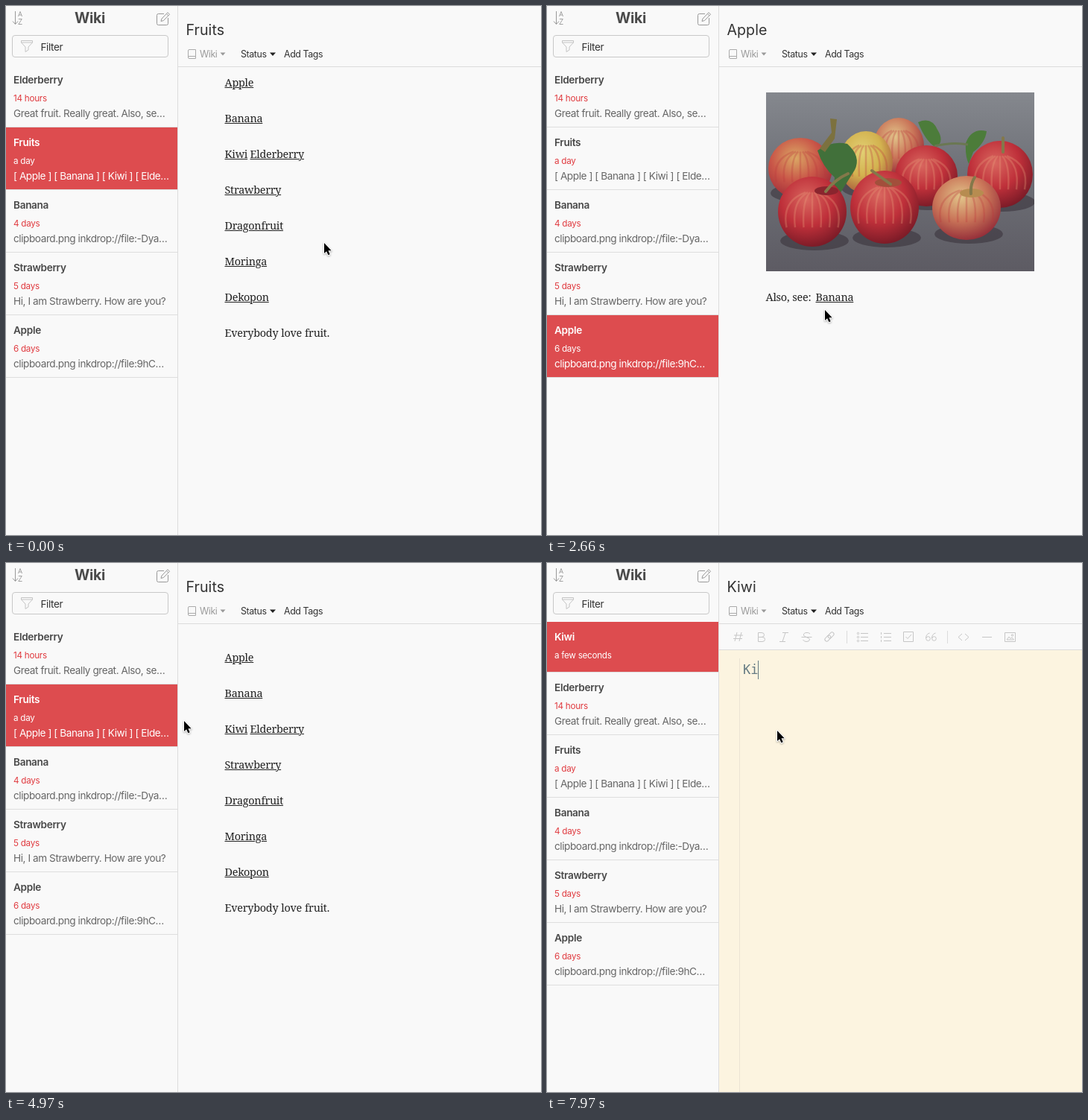
Animation of 718 by 710 pixels, one loop 8 s. Source, as an HTML page:

```html
<!DOCTYPE html>
<html lang="en">
<head>
<meta charset="utf-8">
<title>Wiki notes</title>
<style>
html, body { margin: 0; width: 100%; height: 100%; overflow: hidden; background: #f9f9f9; }
#stage { position: absolute; left: 0; top: 0; width: 718px; height: 710px; overflow: hidden; font-family: Inter, "Open Sans", sans-serif; color: #333; }
#stage div, #stage svg { position: absolute; }
.t { line-height: 24px; white-space: pre; }
.head { font-size: 19.6px; font-weight: 700; letter-spacing: -.35px; color: #4a4a4a; }
.title { font-size: 19.6px; letter-spacing: .05px; }
.bar { font-size: 12.4px; letter-spacing: -.4px; }
.dim { color: #999; }
.body, .filter { font-size: 13.6px; letter-spacing: -.43px; }
.body { color: #666; }
.name { font-size: 13.6px; font-weight: 600; letter-spacing: -.32px; color: #484848; }
.age { font-size: 11.65px; letter-spacing: -.25px; color: #e03a3f; }
#stage .row { position: relative; box-sizing: border-box; width: 230px; height: 84px; border-bottom: 1px solid #dedede; }
#stage .row.short { height: 68px; }
.row.on { background: #dd4c4f; border-color: #dd8a8c; }
.row.on .t { color: #fff; }
.serif { font-family: "Noto Serif", serif; font-size: 14.4px; letter-spacing: -.25px; word-spacing: .5px; color: #222; }
.link { text-decoration: underline 1px; text-underline-offset: 1px; text-decoration-skip-ink: auto; }
.mono { font-family: "DejaVu Sans Mono", monospace; font-size: 17px; color: #657b83; }
.wiki { color: #2aa198; }
.hint { color: #b9bdb4; }
.box { box-sizing: border-box; }
</style>
</head>
<body>
<div id="stage"></div>
<script>
const stage = document.getElementById('stage');

function add(parent, cls = '', css = '') {
  const el = document.createElement('div');
  el.className = cls;
  el.style.cssText = css;
  parent.append(el);
  return el;
}
// y is the middle of the capitals
function text(parent, x, y, str, cls) {
  const el = add(parent, 't ' + cls, `left:${x}px;top:${y - 12}px`);
  el.textContent = str;
  return el;
}
function rect(parent, x, y, w, h, style) {
  return add(parent, 'box', `left:${x}px;top:${y}px;width:${w}px;height:${h}px;${style}`);
}
function draw(parent, markup) {
  parent.insertAdjacentHTML('beforeend',
    `<svg width="718" height="710" style="left:0;top:0;pointer-events:none" fill="none">${markup}</svg>`);
  return parent.lastElementChild;
}
const shape = (d, attrs = '') => `<path d="${d}" ${attrs}/>`;
const oval = (x, y, rx, ry, fill, more = '') =>
  `<ellipse cx="${x}" cy="${y}" rx="${rx}" ry="${ry}" fill="${fill}" ${more}/>`;

// Sidebar
rect(stage, 230, 0, 1, 710, 'background:#dcdcdc');
text(stage, 92, 16, 'Wiki', 'head');
rect(stage, 8, 39, 210, 30, 'border:1px solid #c8c8c8;border-radius:4px');
text(stage, 46.5, 55, 'Filter', 'filter');
draw(stage, `<g stroke="#999">
  ${shape('M12.5 7V24M9 20.5L12.5 24.5L16 20.5')}
  ${shape('M16.5 14L19 7.5L21.5 14M17.3 12H20.7M16.8 17.5H21.3L16.8 24.5H21.6', 'stroke-width=".9"')}
  ${shape('M212 10.5H204.5Q202.5 10.5 202.5 12.5V23.5Q202.5 25.5 204.5 25.5H215.5Q217.5 25.5 217.5 23.5V16')}
  ${shape('M208 20.5L209 17L217 8.7L219.5 11.2L211.5 19.5ZM215.5 10.5L217.8 12.8')}
</g>`);
const funnel = draw(stage, shape('M20.5 46.5H35.5V49L30 55V59L26 61.5V55L20.5 49ZM20.5 49H35.5', 'stroke="#c4c4c4"'));
const spinner = draw(stage, '<circle cx="28" cy="54.5" r="8" stroke="#e9e9e9" stroke-width="1.5"/>' +
  shape('M27 45.5A8.5 8.5 0 0 1 36.5 54', 'stroke="#b5b5b5" stroke-width="1.5"'));

const list = add(stage, '', 'left:0;top:79px;width:230px');
const rows = {};
for (const [name, age, body] of [
  ['Kiwi', 'a few seconds'],
  ['Elderberry', '14 hours', 'Great fruit. Really great. Also, se…'],
  ['Fruits', 'a day', '[ Apple ] [ Banana ] [ Kiwi ] [ Elde…'],
  ['Banana', '4 days', 'clipboard.png inkdrop://file:-Dya…'],
  ['Strawberry', '5 days', 'Hi, I am Strawberry. How are you?'],
  ['Apple', '6 days', 'clipboard.png inkdrop://file:9hC…']
]) {
  const row = rows[name] = add(list, body ? 'row' : 'row short');
  text(row, 10, 20, name, 'name');
  text(row, 10, 45, age, 'age');
  if (body) text(row, 10, 65, body, 'body');
}

// Note header
const title = text(stage, 241.5, 32, '', 'title');
text(stage, 260, 65, 'Wiki', 'bar dim');
text(stage, 315, 65, 'Status', 'bar');
text(stage, 373, 65, 'Add Tags', 'bar');
rect(stage, 231, 81, 487, 1, 'background:#dcdcdc');
draw(stage, shape('M246 58.5H254.5V70.5H246Q244.5 70.5 244.5 69V60Q244.5 58.5 246 58.5ZM244.5 69Q244.5 67.5 246 67.5H254.5', 'stroke="#aaa"') +
  shape('M287.5 62.5H294.5L291 66.5Z', 'fill="#999"') +
  shape('M354 62.5H362L358 67Z', 'fill="#222"'));

// Rendered notes
const names = ['Apple', 'Banana', 'Kiwi', 'Strawberry', 'Dragonfruit', 'Moringa', 'Dekopon'];
const fruits = add(stage);
names.forEach((n, i) => text(fruits, 293.5, 103 + 48 * i, n, 'serif link'));
text(fruits, 327.5, 199, 'Elderberry', 'serif link');
text(fruits, 293.5, 439, 'Everybody love fruit.', 'serif');

function photoNote(see, art) {
  const note = add(stage);
  draw(note, art);
  text(note, 293.5, 391, 'Also, see:', 'serif');
  text(note, 360.5, 391, see, 'serif link');
  return note;
}

const fade = (id, a, b, c) => `<radialGradient id="${id}" cx=".42" cy=".33" r=".68">
  <stop stop-color="${a}"/><stop offset=".55" stop-color="${b}"/><stop offset="1" stop-color="${c}"/></radialGradient>`;
const crop = [
  [472, 188, 34, 38, 'pale'], [428, 210, 36, 42, 'gold'], [340, 218, 43, 41, 'blush'],
  [509, 228, 42, 41, 'red'], [608, 226, 44, 45, 'red'], [356, 276, 46, 47, 'red'],
  [453, 270, 46, 49, 'red'], [563, 271, 46, 43, 'pale']
];
// Skin streaks fan out from the stem
function fruit([x, y, rx, ry, skin]) {
  let streaks = '';
  for (let k = -3; k <= 3; k++) {
    streaks += `M${x + 3 * k} ${y - ry * .55}Q${x + k * rx * .3} ${y - ry * .3} ${x + k * rx * .25} ${y + ry * .45}`;
  }
  return oval(x, y, rx, ry, `url(#${skin})`) +
    shape(streaks, `stroke="${skin === 'red' ? '#e8a07c' : '#b8393c'}" stroke-width="2.5" opacity=".3"`);
}
const apple = photoNote('Banana', `<defs>
  <linearGradient id="table" x2="0" y2="1"><stop stop-color="#85888e"/><stop offset=".45" stop-color="#6e7077"/><stop offset="1" stop-color="#5d5b63"/></linearGradient>
  ${fade('red', '#d9675f', '#bf303a', '#7c1b27')}${fade('pale', '#e2c58a', '#c97458', '#96303a')}
  ${fade('gold', '#e2d074', '#d3b24f', '#a85a3c')}${fade('blush', '#dba965', '#c95648', '#a22d38')}
  <clipPath id="frame"><rect x="294" y="116" width="360" height="240"/></clipPath></defs>
  <g clip-path="url(#frame)"><rect x="294" y="116" width="360" height="240" fill="url(#table)"/>
  ${crop.map(([x, y, rx, ry]) => oval(x + 3, y + ry - 8, rx, 13, '#3b353c', 'opacity=".6"')).join('')}
  ${shape('M498 156Q516 148 524 166Q534 182 522 190Q508 182 498 156M562 184Q570 163 590 168Q588 184 572 196L566 212Q561 202 562 184', 'fill="#4c7c3a"')}
  ${shape('M520 188Q545 182 565 186', 'stroke="#6a7752" stroke-width="3"')}
  ${crop.slice(0, 5).map(fruit).join('')}
  ${shape('M363 194Q382 180 403 185Q422 202 413 220L393 252Q384 246 386 230Q370 216 363 194', 'fill="#41703a"')}
  ${shape('M366 191L382 170L380 151L389 152L386 178L373 196Z', 'fill="#7c713f"')}
  ${crop.slice(5).map(fruit).join('')}
  ${oval(375, 248, 16, 6, '#8a252e')}${oval(458, 237, 18, 6, '#a24f3b')}${oval(570, 251, 16, 6, '#b78c50')}
  ${shape('M374 249Q386 233 404 225M461 239L436 221M569 252Q568 239 574 230M612 196V177', 'stroke="#84784a" stroke-width="4" stroke-linecap="round"')}
  </g>`);

const banana = photoNote('Apple', `<defs>
  <linearGradient id="peel" x2=".25" y2="1"><stop stop-color="#e3b927"/><stop offset=".4" stop-color="#f8d238"/><stop offset="1" stop-color="#dc9f1c"/></linearGradient></defs>
  <rect x="294" y="116" width="360" height="240" fill="#fdfdfd"/>
  ${shape('M392 310Q430 326 472 310Q525 308 546 290L556 260Q510 278 450 286Z', 'fill="#dededc"')}
  <g fill="url(#peel)" stroke="#b98212" stroke-width="1">
  ${shape('M404 160C438 188 500 208 574 211L578 224C530 240 455 226 408 186Z')}
  ${shape('M402 172C437 216 500 234 569 232L572 244C537 270 445 276 405 205Z')}
  ${shape('M383 164C334 188 331 284 378 307C410 320 453 315 470 301L468 288C445 290 405 270 392 190Z')}
  ${shape('M387 168C375 227 402 302 518 300Q536 298 544 288L541 275C473 266 425 238 404 169Z')}</g>
  ${shape('M380 185C366 245 392 290 462 296M410 203C440 252 500 258 562 244M415 190C458 224 520 228 572 221M386 195C388 255 430 292 530 292', 'stroke="#c98f18" stroke-width="5" opacity=".5"')}
  ${shape('M394 190C410 245 460 275 525 282M420 186C460 210 510 217 560 217', 'stroke="#fbe269" stroke-width="5" opacity=".6"')}
  ${shape('M379 180Q377 166 382 160L406 162L411 183L399 171L391 186L386 173Z', 'fill="#a9a83b"')}
  ${shape('M379 153L391 149L408 152L411 163L397 169L383 163Z', 'fill="#4d2c22"')}
  ${shape('M573 213L578 212V223L574 224ZM568 232L573 230L574 242L569 243ZM540 276L545 278L543 287L539 284ZM466 289L470 290L471 299L467 300Z', 'fill="#3b2c1d" stroke="#3b2c1d"')}`);

// Editor
const editor = add(stage);
rect(editor, 231, 82, 487, 34, 'background:#f9f9f9');
rect(editor, 231, 116, 487, 594, 'background:#fcf4e0;border-top:1px solid #dcdcdc');
rect(editor, 258, 128, 1, 582, 'background:#ebe4d3');
draw(editor, `<g stroke="#c6c6c6">
  ${shape('M255 93L252 105M261 93L258 105M251 97H263M250 101.5H262')}
  ${shape('M283.5 93.5H288Q291.5 93.5 291.5 96.5T288 99.5H283.5ZM283.5 99.5H289Q292.5 99.5 292.5 102.5T289 105.5H283.5Z')}
  ${shape('M316 93.5H324M312 105.5H320M320 93.5L316 105.5')}
  ${shape('M353 95Q351 93 348 93.5Q344 94 344.5 97Q345 98.5 348 99.5Q353 101 352.5 103Q352 105.5 348 105.5Q345 105.5 343.5 103M341.5 99.5H355.5')}
  <g transform="rotate(-45 379 99)"><rect x="371.5" y="96.5" width="9" height="5" rx="2.5"/><rect x="377.5" y="96.5" width="9" height="5" rx="2.5"/></g>
  ${shape('M402.5 91V108M537.5 91V108', 'stroke="#dcdcdc"')}
  ${[94.5, 99.5, 104.5].map(y => shape(`M421 ${y}H431M452 ${y}H462M448.5 ${y - 1.5}V${y + 1.5}`) + `<circle cx="417.5" cy="${y}" r="1.2"/>`).join('')}
  ${shape('M478.5 92.5H491.5V105.5H478.5ZM481.5 99L484 101.5L489 96')}
  ${[508.5, 516.5].map(x => shape(`M${x + 5} 94Q${x} 95.5 ${x} 101`) + `<circle cx="${x + 3}" cy="101.5" r="2.8"/>`).join('')}
  ${shape('M557 95L552 99.5L557 104M561 95L566 99.5L561 104M584 99.5H597')}
  ${shape('M614.5 93.5H628.5V105.5H614.5ZM617 103L620 99L622 101.5L624 100L626.5 103Z')}<circle cx="624.5" cy="97" r="1.2"/>
</g>`);

const COL = 10.234, LEFT = 263;
const source = add(editor);
rect(source, 264, 133, 10, 20, 'background:#93a09c');
rect(source, 345, 133, 10, 20, 'background:#93a09c');
names.forEach((n, i) => {
  const y = 143 + 50 * i;
  text(source, LEFT, y, `[[${n}]]`, 'mono wiki');
  rect(source, 264, y + 11, (n.length + (i ? 4 : 3)) * COL - 1, 1, 'background:#2aa198');
});
text(source, LEFT, 143, '[', 'mono');
text(source, LEFT + 8 * COL, 143, ']', 'mono');
text(source, LEFT + 9 * COL, 243, '[[Elderberry]]', 'mono wiki');
text(source, LEFT, 493, 'Everybody love fruit.', 'mono');
const typed = text(editor, LEFT, 143, '', 'mono');
const hint = text(editor, LEFT, 143, 'Type something...', 'mono hint');
const caret = rect(editor, LEFT, 131, 1, 25, 'background:#657b83');

const cursor = draw(stage, shape('M0 0V14L3.1 11.2L5.4 16.3L7.7 15.3L5.5 10.3H9.7Z',
  'fill="#000" stroke="#fff" stroke-width="2" paint-order="stroke" stroke-linejoin="round"'));
cursor.style.overflow = 'visible';
cursor.style.filter = 'drop-shadow(0 1px 1px rgba(0,0,0,.3))';

// Each step adds to the state before it
const steps = [
  [0, { sel: 'Fruits', view: fruits, head: 'Fruits', drop: 0, busy: false, fresh: false, caret: true, typed: '' }],
  [1820, { sel: 'Apple' }],
  [1880, { view: apple, head: 'Apple' }],
  [3260, { sel: 'Banana' }],
  [3320, { view: banana, head: 'Banana' }],
  [4380, { sel: 'Fruits' }],
  [4440, { view: fruits, head: 'Fruits', drop: 24 }],
  [6200, { sel: '' }],
  [6380, { view: editor, busy: true }],
  [6500, { sel: 'Kiwi', head: 'Kiwi', fresh: true }],
  [6560, { busy: false }],
  [6800, { caret: false }],
  [7340, { caret: true }],
  [7820, { typed: 'K' }],
  [7970, { typed: 'Ki' }]
];
const path = [
  [0, 427, 318], [290, 427, 318], [810, 291, 103], [1160, 291, 103], [1400, 302, 105],
  [2180, 302, 105], [2660, 373, 408], [2960, 379, 394], [3620, 379, 394], [3970, 175, 226],
  [4200, 125, 224], [4680, 125, 224], [4970, 239, 212], [5260, 270, 206], [5490, 270, 206],
  [5850, 303, 230], [6140, 304, 225], [6380, 304, 225], [6560, 309, 225], [8000, 309, 225]
];
const LOOP = 8000, TICK = 60;

function pointer(t) {
  const i = path.findIndex(p => p[0] > t);
  const [t0, x0, y0] = path[i - 1], [t1, x1, y1] = path[i];
  const u = Math.floor((t - t0) / TICK) * TICK / (t1 - t0);
  const e = u * u * (3 - 2 * u);
  return [x0 + (x1 - x0) * e, y0 + (y1 - y0) * e];
}
const show = (el, on) => { el.style.display = on ? '' : 'none'; };

function render(t) {
  const s = Object.assign({}, ...steps.filter(p => p[0] <= t).map(p => p[1]));
  for (const n in rows) rows[n].classList.toggle('on', n === s.sel);
  show(rows.Kiwi, s.fresh);
  for (const v of [fruits, apple, banana, editor]) show(v, v === s.view);
  fruits.style.top = s.drop + 'px';
  title.textContent = s.head;
  show(funnel, !s.busy);
  show(spinner, s.busy);
  show(source, !s.fresh);
  show(hint, s.fresh && !s.typed);
  typed.textContent = s.typed;
  show(caret, s.caret);
  caret.style.left = Math.floor(LEFT + s.typed.length * COL) + 'px';
  const [x, y] = pointer(t);
  cursor.style.transform = `translate(${x}px,${y}px)`;
}

const start = performance.now();
function frame() {
  render((performance.now() - start) % LOOP);
  requestAnimationFrame(frame);
}
frame();
</script>
</body>
</html>
```
